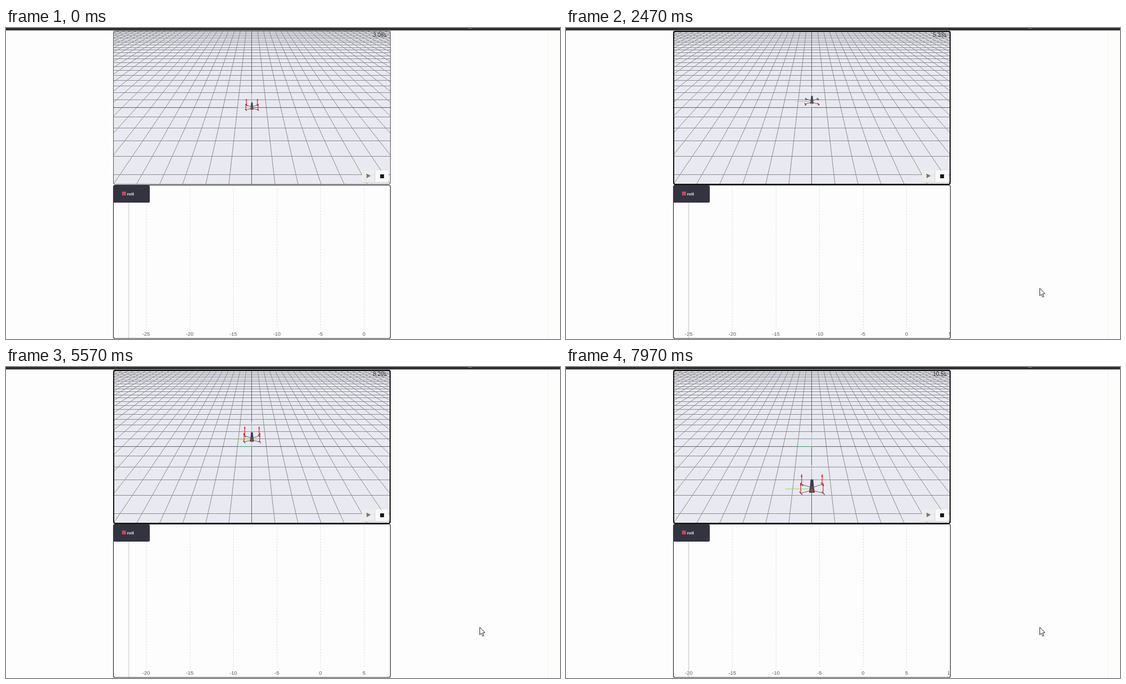
An HTML page with a canvas for the animation above (8000 ms loop, 998 by 561 pixels).

```html
<!DOCTYPE html>
<html lang="en">
<head>
<meta charset="utf-8">
<title>Drone simulator</title>
<style>
  html, body { margin: 0; width: 100%; height: 100%; overflow: hidden; background: #fdfdfd; }
  canvas { display: block; }
</style>
</head>
<body>
<canvas id="stage" width="998" height="561"></canvas>
<script>
const ctx = document.getElementById('stage').getContext('2d');
const LOOP = 8000;
const FONT = '"Liberation Sans", Arial, sans-serif';

// Ground plane projection
const CX = 443, HORIZON = -86.8, DEPTH = 14.58, SCALE = 3365, SPREAD = 0.1128;
const ORIGIN_Y = 144, UNIT = 26;

const keyTimes = [0, 1730, 3170, 4770, 6230, 7000, 7970];
const tracks = {
  sim:    [3.08, 4.62, 6.00, 7.46, 8.82, 9.58, 10.5],
  y:      [143.5, 143.5, 122, 120.5, 147, 201, 220],
  size:   [26, 26, 30.5, 32, 36, 46, 48],
  thrust: [0.42, 0.42, -0.38, 0.46, 0.5, 0.3, 0.38]
};

// Monotone cubic interpolation through the key values
function sample(values, t) {
  const last = keyTimes.length - 1;
  if (t >= keyTimes[last]) return values[last];
  let i = 0;
  while (t >= keyTimes[i + 1]) i++;
  const slope = k => (values[k + 1] - values[k]) / (keyTimes[k + 1] - keyTimes[k]);
  const tangent = k => {
    if (k === 0) return slope(0);
    if (k === last) return slope(last - 1);
    const a = slope(k - 1), b = slope(k);
    return a * b <= 0 ? 0 : 2 * a * b / (a + b);
  };
  const h = keyTimes[i + 1] - keyTimes[i], u = (t - keyTimes[i]) / h, v = 1 - u;
  return v * v * (1 + 2 * u) * values[i] + u * v * v * h * tangent(i)
       + u * u * (1 + 2 * v) * values[i + 1] - u * u * v * h * tangent(i + 1);
}

function line(x1, y1, x2, y2, color, width = 1) {
  ctx.strokeStyle = color;
  ctx.lineWidth = width;
  ctx.beginPath();
  ctx.moveTo(x1, y1);
  ctx.lineTo(x2, y2);
  ctx.stroke();
}

function rect(x, y, w, h, color) {
  ctx.fillStyle = color;
  ctx.fillRect(x, y, w, h);
}

function polygon(points, fill, stroke) {
  ctx.beginPath();
  points.forEach(([x, y]) => ctx.lineTo(x, y));
  ctx.closePath();
  ctx.fillStyle = fill;
  ctx.fill();
  if (stroke) {
    ctx.strokeStyle = stroke;
    ctx.lineWidth = 1;
    ctx.stroke();
  }
}

function text(str, x, y, font, color, align) {
  ctx.font = font + ' ' + FONT;
  ctx.fillStyle = color;
  ctx.textAlign = align;
  ctx.fillText(str, x, y);
}

function frame(x, y, w, h, color, width) {
  ctx.strokeStyle = color;
  ctx.lineWidth = width;
  ctx.beginPath();
  ctx.roundRect(x, y, w, h, 3);
  ctx.stroke();
}

function drawGrid() {
  rect(193, 5, 500, 277, '#e9e9f1');
  for (let j = -24; j <= 24; j++) {
    if (j === 0) continue;
    const at = y => CX + j * SPREAD * (y - HORIZON);
    line(at(5), 5, at(282), 282, '#8b8b8b');
  }
  for (let i = -22; i <= 5; i++) {
    const y = Math.floor(HORIZON + SCALE / (DEPTH - i)) + 0.5;
    line(193, y, 693, y, i === 0 ? '#5c5c60' : '#8a8a92');
  }
  line(CX - 0.5, 5, CX - 0.5, 282, '#5c5c60');
}

function drawDrone(t) {
  const y = sample(tracks.y, t), s = sample(tracks.size, t), thrust = sample(tracks.thrust, t);

  // World axes, then the drone's own
  line(CX - UNIT, ORIGIN_Y - 0.5, CX, ORIGIN_Y - 0.5, '#2f9c62');
  line(CX - 0.5, ORIGIN_Y, CX - 0.5, ORIGIN_Y - UNIT, '#8cc0e6');
  line(CX - s, y, CX, y, '#8ce03c');
  line(CX - 0.5, y, CX - 0.5, y - s * 0.9, '#78b4e2');

  const rotors = [[0.385, -0.17], [0.42, 0.16]];
  for (const [dx, dy] of rotors) {
    for (const side of [-1, 1]) {
      const x = CX + side * dx * s, ry = y + dy * s, tip = ry - thrust * s;
      line(CX, y + dy * s * 0.3, x, ry, '#5a5254', 0.9);
      line(x - s * 0.05, ry - s * 0.06, x + s * 0.06, ry + s * 0.06, '#4a3c40', 1.2);
      line(x, ry, x, tip, '#dc3038', 1.3);
      const head = Math.sign(thrust) * s * 0.09;
      polygon([[x, tip], [x - 1.7, tip + head], [x + 1.7, tip + head]], '#d8202c');
    }
  }

  const body = (top, bottom, w1, w2, color) => polygon([
    [CX - w1 * s, y + top * s], [CX + w1 * s, y + top * s],
    [CX + w2 * s, y + bottom * s], [CX - w2 * s, y + bottom * s]], color);
  body(-0.36, -0.08, 0.05, 0.075, '#383c58');
  body(-0.08, 0.14, 0.075, 0.11, '#59453f');
  body(0.0, 0.09, 0.03, 0.05, '#8b5747');
}

function drawButtons() {
  rect(641, 257, 23, 21, 'rgba(240,240,240,0.88)');
  rect(665, 257, 24, 21, 'rgba(251,251,251,0.93)');
  line(664.5, 257, 664.5, 278, '#d2d2d6');
  line(641, 278.5, 689, 278.5, '#d2d2d6');
  polygon([[649.5, 262.5], [657, 266.8], [649.5, 271]], '#77777a');
  rect(674, 264, 7, 7, '#18181c');
}

function drawView(t, sim) {
  ctx.save();
  ctx.beginPath();
  ctx.roundRect(193, 5, 500, 277.5, 3);
  ctx.clip();
  drawGrid();
  drawDrone(t);
  text(sim.toPrecision(3) + 's', 685.5, 16, '10px', '#36363a', 'right');
  drawButtons();
  ctx.restore();
  if (t < 400) frame(193.5, 5.5, 499, 276.5, '#55555a', 1);
  else frame(194, 6, 498, 276, '#101012', 2);
}

function drawChart(sim) {
  const step = Math.max(0, Math.floor((sim - 3.1) / 0.5));
  const zero = 645 - 7.85 * step;
  ctx.save();
  ctx.beginPath();
  ctx.rect(194, 284, 499, 277);
  ctx.clip();
  for (let v = -30; v <= 10; v += 5) {
    const x = zero + v * 15.7;
    if (x < 221 || x > 693) continue;
    ctx.setLineDash([3, 2]);
    line(Math.floor(x) + 0.5, 284, Math.floor(x) + 0.5, 545, '#e0e0e2');
    ctx.setLineDash([]);
    text(String(v), x, 555, '9.5px', '#5c5c5c', 'center');
  }
  line(221, 284, 221, 560, '#c4c4c2');
  ctx.restore();
  frame(193.5, 283.5, 499, 276.5, '#2c2c30', 1.2);

  ctx.fillStyle = '#343440';
  ctx.beginPath();
  ctx.roundRect(193.5, 284, 65.5, 31, 2);
  ctx.fill();
  rect(209, 295, 7, 7, '#b84c60');
  text('roll', 218, 302, 'bold 8px', '#f2f2f2', 'left');
}

function drawCursor(x, y) {
  const shape = [[0, 0], [0, 13.5], [3, 10.8], [5.2, 16], [7.4, 15], [5.2, 10], [9.3, 9.6]];
  polygon(shape.map(([dx, dy]) => [x + dx, y + dy]), '#ffffff', '#26262e');
}

function draw(t) {
  const sim = sample(tracks.sim, t);
  rect(0, 0, 998, 561, '#fdfdfd');
  rect(0, 0, 998, 4, '#2d2d2f');
  rect(0, 4, 998, 1, '#a9a9a9');
  rect(832, 0, 8, 1, '#77777a');
  line(976.5, 5, 976.5, 561, '#f5f5e2');
  drawView(t, sim);
  drawChart(sim);
  if (t >= 900) drawCursor(853.5, 469.5);
}

const start = performance.now();
function tick(now) {
  draw(Math.max(0, now - start) % LOOP);
  requestAnimationFrame(tick);
}
draw(0);
requestAnimationFrame(tick);
</script>
</body>
</html>
```
